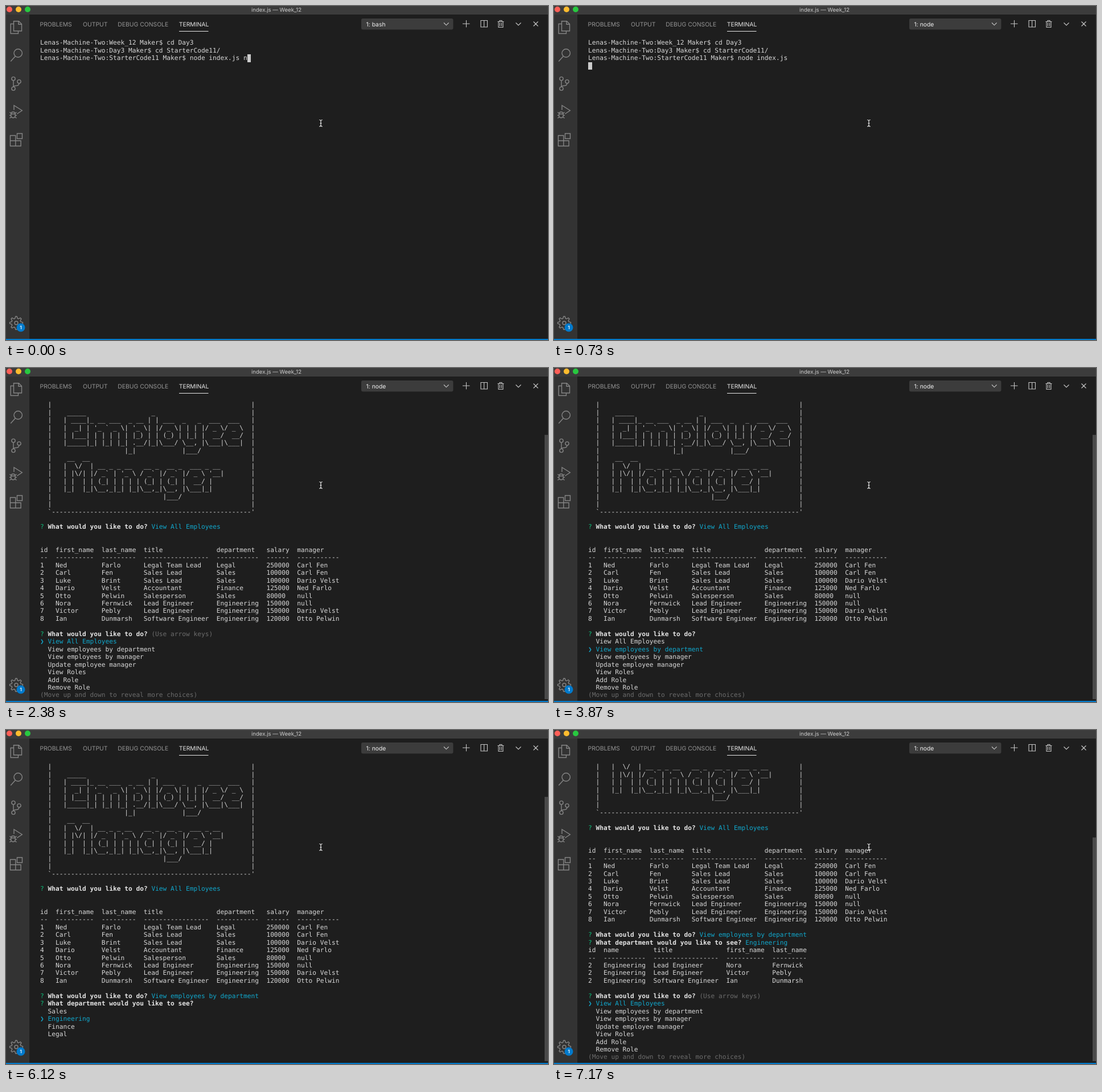
Recreate the animation shown at these times as an HTML page. Size 952 by 588 pixels, loop 8 s.

```html
<!DOCTYPE html>
<html lang="en">
<head>
<meta charset="utf-8">
<title>Employee Manager</title>
<style>
html, body { margin: 0; width: 100%; height: 100%; overflow: hidden; background: #1e1e1e; }
svg { position: absolute; left: 0; top: 0; }
svg text { font: 10.4px Inter, "Liberation Sans", sans-serif; text-rendering: geometricPrecision; }
#term {
  position: absolute; left: 60px; top: 58.2px; margin: 0; width: 880px; height: 526px;
  font: 11.19px/13.45px "DejaVu Sans Mono", "Liberation Mono", monospace;
  text-rendering: geometricPrecision; color: #d8d8d8; overflow: hidden;
}
#term b { color: #e5e5e5; }
.ask { color: #0dbc79; }
.pick { color: #11a8cd; }
.hint { color: #6c6c6c; }
.arrow { position: absolute; }
.cursor { position: absolute; width: 1ch; height: 13.45px; background: #ccc; }
</style>
</head>
<body>
<svg width="952" height="588" fill="none">
  <path d="M0 0H952V15H0z" fill="#3c3c3c"/>
  <path d="M0 15H41V586H0z" fill="#333"/>
  <path d="M0 586H952V588H0z" fill="#007acc"/>
  <circle cx="6" cy="6" r="5" fill="#ff5f57"/>
  <circle cx="22" cy="6" r="5" fill="#febc2e"/>
  <circle cx="38" cy="6" r="5" fill="#28c840"/>
  <text x="475" y="9.6" text-anchor="middle" fill="#ccc" style="font-size:9.6px">index.js — Week_12</text>

  <g fill="#969696">
    <text x="59.5" y="35.7">PROBLEMS</text>
    <text x="135" y="35.7">OUTPUT</text>
    <text x="196.2" y="35.7">DEBUG CONSOLE</text>
    <text x="303.7" y="35.7" fill="#e7e7e7">TERMINAL</text>
  </g>
  <path d="M304 44.5H355.5" stroke="#e7e7e7"/>
  <rect x="624" y="22" width="161.5" height="19.5" rx="3" fill="#3c3c3c"/>
  <text id="shell" x="632.5" y="35.7" fill="#f0f0f0"></text>

  <g stroke="#c5c5c5" stroke-width="1.1">
    <path d="M769 29.5l4.3 4.3l4.3-4.3M808.5 25v12.5M802 31.2h12.5M895.5 29.5l4.5 4.5l4.5-4.5M926.5 27.5l8 8m0-8l-8 8"/>
    <path d="M834 25.5h11.5v11.5h-11.5zM839.7 25.5v11.5"/>
    <path d="M863.5 27.5h11M867 27.5v-2h4v2M865 27.5v10h8v-10M867.5 29.5v6M870.5 29.5v6"/>
  </g>

  <g stroke="#858585" stroke-width="1.4">
    <path d="M13.5 26.8h9l5 5v12.2h-14zM22 26.8v5.4h5.5M13.5 31.5h-5.3v17h13.3v-4.5"/>
    <circle cx="21.2" cy="83" r="7.2"/>
    <path d="M16.3 88.5l-8.1 9"/>
    <circle cx="13" cy="128" r="3.1"/>
    <circle cx="13" cy="145.5" r="3.1"/>
    <circle cx="23" cy="133" r="3.1"/>
    <path d="M13 131v11.4M23 136c0 4-3 4.5-6 4.5c-2 0-4 .5-4 2"/>
    <path d="M14 183v-8l14.3 9l-9 6"/>
    <path d="M8.8 191c0-6 7.4-6 7.4 0v2c0 5-7.4 5-7.4 0zM8.8 190h7.4M6.5 187l2.5 2M18.5 187l-2.5 2M6 192.5h2.8M16.2 192.5h2.8M6.5 197.5l2.5-2M18.5 197.5l-2.5-2"/>
    <path d="M7.5 228h9.3v18.5h-9.3zM7.5 237.2h18.6v9.3h-9.3M26.1 237.2v9.3M19.5 224.5h9v9h-9z"/>
    <polygon id="gear"/>
    <circle cx="18" cy="558" r="3"/>
  </g>
  <circle cx="26" cy="566" r="7.5" fill="#007acc"/>
  <text x="26" y="569.2" text-anchor="middle" fill="#fff" style="font-size:8.5px;font-weight:600">1</text>
  <path id="bar" fill="#4a4a4a"/>
</svg>
<pre id="term"></pre>
<svg width="952" height="588" fill="none">
  <path d="M550.2 200.5q2.8 0 2.8 2q0-2 2.8-2M553 202v8.5M550.2 212q2.8 0 2.8-2q0 2 2.8 2M551.5 206.5h3" stroke="#e8e8e8" stroke-width="1.2"/>
</svg>
<pre id="art" hidden>
 _____                 _
| ____|_ __ ___  _ __ | | ___  _   _  ___  ___
|  _| | '_ ` _ \| '_ \| |/ _ \| | | |/ _ \/ _ \
| |___| | | | | | |_) | | (_) | |_| |  __/  __/
|_____|_| |_| |_| .__/|_|\___/ \__, |\___|\___|
                |_|            |___/
 __  __
|  \/  | __ _ _ __   __ _  __ _  ___ _ __
| |\/| |/ _` | '_ \ / _` |/ _` |/ _ \ '__|
| |  | | (_| | | | | (_| | (_| |  __/ |
|_|  |_|\__,_|_| |_|\__,_|\__, |\___|_|
                          |___/
</pre>
<script>
const LOOP = 8000, ROWS = 39, VIEW_TOP = 58, VIEW_H = 525;
const $ = id => document.getElementById(id);
const span = (cls, text = '') => `<span class="${cls}">${text}</span>`;

const prompt = (dir, cmd) => `Lenas-Machine-Two:${dir} Maker$ ${cmd}`;
const ask = (text, tail = '') => `${span('ask', '?')} <b>${text}</b> ${tail}`;
const list = (items, at) => items.map((s, i) =>
  i === at ? span('pick', span('arrow', '❯') + '  ' + s) : '  ' + s);

function table(text) {
  const rows = text.trim().split('\n').map(r => r.trim().split('|'));
  const widths = rows[0].map((_, c) => Math.max(...rows.map(r => r[c].length)));
  rows.splice(1, 0, widths.map(w => '-'.repeat(w)));
  return rows.map(r => r.map((s, c) => s.padEnd(widths[c])).join('  '));
}

const art = ['', ...$('art').textContent.replace(/^\n|\n$/g, '').split('\n'), ''];
const rule = '-'.repeat(52);
const banner = [`  ,${rule}.`, ...art.map(s => '  |' + ('   ' + s).padEnd(52) + '|'), `  \`${rule}'`];

const staff = table(`
  id|first_name|last_name|title|department|salary|manager
  1|Ned|Farlo|Legal Team Lead|Legal|250000|Carl Fen
  2|Carl|Fen|Sales Lead|Sales|100000|Carl Fen
  3|Luke|Brint|Sales Lead|Sales|100000|Dario Velst
  4|Dario|Velst|Accountant|Finance|125000|Ned Farlo
  5|Otto|Pelwin|Salesperson|Sales|80000|null
  6|Nora|Fernwick|Lead Engineer|Engineering|150000|null
  7|Victor|Pebly|Lead Engineer|Engineering|150000|Dario Velst
  8|Ian|Dunmarsh|Software Engineer|Engineering|120000|Otto Pelwin`);
const team = table(`
  id|name|title|first_name|last_name
  2|Engineering|Lead Engineer|Nora|Fernwick
  2|Engineering|Lead Engineer|Victor|Pebly
  2|Engineering|Software Engineer|Ian|Dunmarsh`);

const actions = ['View All Employees', 'View employees by department', 'View employees by manager',
  'Update employee manager', 'View Roles', 'Add Role', 'Remove Role'];
const depts = ['Sales', 'Engineering', 'Finance', 'Legal'];
const todo = 'What would you like to do?', which = 'What department would you like to see?';
const keys = span('hint', '(Use arrow keys)');
const menu = (at, hint) =>
  [ask(todo, hint), ...list(actions, at), span('hint', '(Move up and down to reveal more choices)')];

const cursor = span('cursor');
const start = [prompt('Week_12', 'cd Day3'), prompt('Day3', 'cd StarterCode11/')];
const run = prompt('StarterCode11', 'node index.js');
const head = [...start, run, '', ...banner, ''];
const shown = [...head, ask(todo, span('pick', actions[0])), '', '', ...staff, ''];
const byDept = [...shown, ask(todo, span('pick', actions[1]))];

// start time, shell name, first visible line, lines
const states = [
  [0, 'bash', 0, [...start, run + ' n' + cursor]],
  [290, 'bash', 0, [...start, run + ' ' + cursor]],
  [590, 'bash', 0, [...start, run, cursor]],
  [730, 'node', 0, [...start, run, cursor]],
  [880, 'node', 0, [...head, ...menu(0, keys)]],
  [2380, 'node', 5, [...shown, ...menu(0, keys)]],
  [3870, 'node', 5, [...shown, ...menu(1)]],
  [4770, 'node', 5, [...byDept, ask(which, keys), ...list(depts, 0)]],
  [6120, 'node', 5, [...byDept, ask(which), ...list(depts, 1)]],
  [7170, 'node', 13, [...byDept, ask(which, span('pick', depts[1])), ...team, '', ...menu(0, keys)]],
];

$('gear').setAttribute('points', Array.from({ length: 32 }, (_, i) => {
  const a = (i - 0.5) * Math.PI / 16, r = i % 4 < 2 ? 11.5 : 8.2;
  return `${18 + r * Math.cos(a)},${558 + r * Math.sin(a)}`;
}).join(' '));

let current;
function draw(now) {
  const t = now % LOOP, state = states.findLast(s => s[0] <= t);
  if (state !== current) {
    current = state;
    const [, shell, top, lines] = state;
    $('shell').textContent = '1: ' + shell;
    $('term').innerHTML = lines.slice(top).join('\n');
    const y = VIEW_TOP + VIEW_H * top / (top + ROWS);
    $('bar').setAttribute('d', top ? `M946 ${y}H952V${VIEW_TOP + VIEW_H}H946z` : '');
  }
  requestAnimationFrame(draw);
}
draw(0);
</script>
</body>
</html>
```
